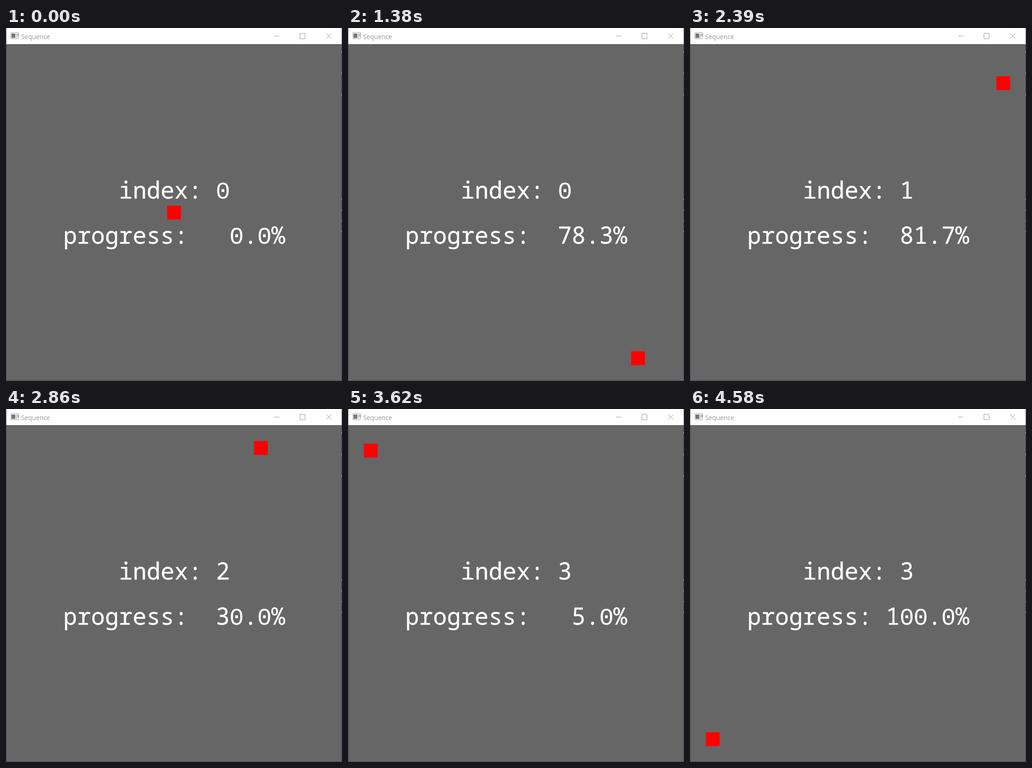
Write an HTML page that moves like this. It is 731x766 px and loops after 5.21 s.

```html
<!DOCTYPE html>
<html lang="en">
<head>
<meta charset="utf-8">
<title>Sequence</title>
<style>
  html, body { margin: 0; width: 100%; height: 100%; overflow: hidden; background: #666; }
  svg { display: block; width: 731px; height: 766px; }
  .big { font: 50.3px "Noto Sans Mono", monospace; fill: #fff; stroke: #fff; stroke-width: .3px; white-space: pre; }
  .zero { font: 52.5px "Liberation Mono", monospace; letter-spacing: -.65px; stroke: none; }
  .title { font: 13.8px "Open Sans", sans-serif; fill: #999; }
</style>
</head>
<body>
<svg viewBox="0 0 731 766" xmlns="http://www.w3.org/2000/svg">
  <rect width="731" height="766" fill="#666"/>
  <rect width="731" height="35" fill="#fff"/>
  <path d="M.5 36V765.5H730.5V36" fill="none" stroke="#464646"/>
  <path d="M0 35.5H731" stroke="#5c5c5c"/>
  <path d="M.5 0V35M730.5 0V35" stroke="#777"/>
  <path d="M730.5 50V148" stroke="#aaa" stroke-dasharray="4 42.5"/>
  <path d="M730.5 370V445" stroke="#aaa" stroke-dasharray="3 20.3"/>
  <g>
    <rect x="10.5" y="9.5" width="17" height="14" rx="1" fill="#f4f4f4" stroke="#aaa"/>
    <rect x="12" y="12" width="8" height="9.5" fill="#777"/>
    <rect x="21" y="12" width="3" height="9.5" fill="#ccc"/>
    <rect x="25" y="12" width="1.5" height="6" fill="#888"/>
  </g>
  <text class="title" x="33" y="24">Sequence</text>
  <path d="M583 17.5H595M639.5 11.5H650.5V23.5H639.5ZM696.5 11.5L708 23M708 11.5L696.5 23" fill="none" stroke="#999"/>
  <text id="index" class="big" x="245.6" y="370"/>
  <text id="progress" class="big" x="124.6" y="467.5"/>
  <rect id="box" width="30" height="30" fill="#f00"/>
</svg>
<script>
  const LOOP = 5210, LEG = 60, CX = 365.5, CY = 400.5, R = 316;
  const $ = id => document.getElementById(id);
  const box = $("box"), indexText = $("index"), progressText = $("progress");

  // The pace drifts slightly: time in ms, screen refresh, simulation tick
  const pace = [[610, 1, 1], [1990, 19, 84], [2860, 30, 138], [3620, 40, 183], [4580, 52, 240]];
  const corners = [[-1, 1], [1, 1], [1, -1], [-1, -1], [-1, 1]];

  const mix = (a, b, k) => a + (b - a) * k;
  const ease = p => p < .5 ? 2 * p * p : 1 - 2 * (1 - p) ** 2;

  // Tick shown at time t, held between refreshes; 0 before the start
  function tickAt(t) {
    if (t < pace[0][0]) return 0;
    const next = pace.findIndex(p => p[0] > t);
    if (next < 0) return pace.at(-1)[2];
    const [t0, n0, g0] = pace[next - 1], [t1, n1, g1] = pace[next];
    const n = Math.floor((n1 - n0) * (t - t0) / (t1 - t0));
    return Math.round(mix(g0, g1, n / (n1 - n0)));
  }

  function write(el, text) {
    el.innerHTML = text.replace(/0/g, '<tspan class="zero" dx="-.65">0</tspan>');
  }

  function show(tick) {
    const leg = Math.min(3, Math.floor(tick / LEG)), step = tick - leg * LEG;
    const e = ease(Math.min(1, (step + 1) / LEG));
    const [x, y] = tick ? [0, 1].map(i => mix(corners[leg][i], corners[leg + 1][i], e)) : [0, 0];
    box.setAttribute("x", CX + R * x - 15);
    box.setAttribute("y", CY + R * y - 15);
    write(indexText, "index: " + leg);
    write(progressText, "progress: " + (step / LEG * 100).toFixed(1).padStart(5) + "%");
  }

  let last = -1;
  const start = performance.now();
  function frame() {
    const tick = tickAt((performance.now() - start) % LOOP);
    if (tick !== last) show(last = tick);
    requestAnimationFrame(frame);
  }
  frame();
</script>
</body>
</html>
```
